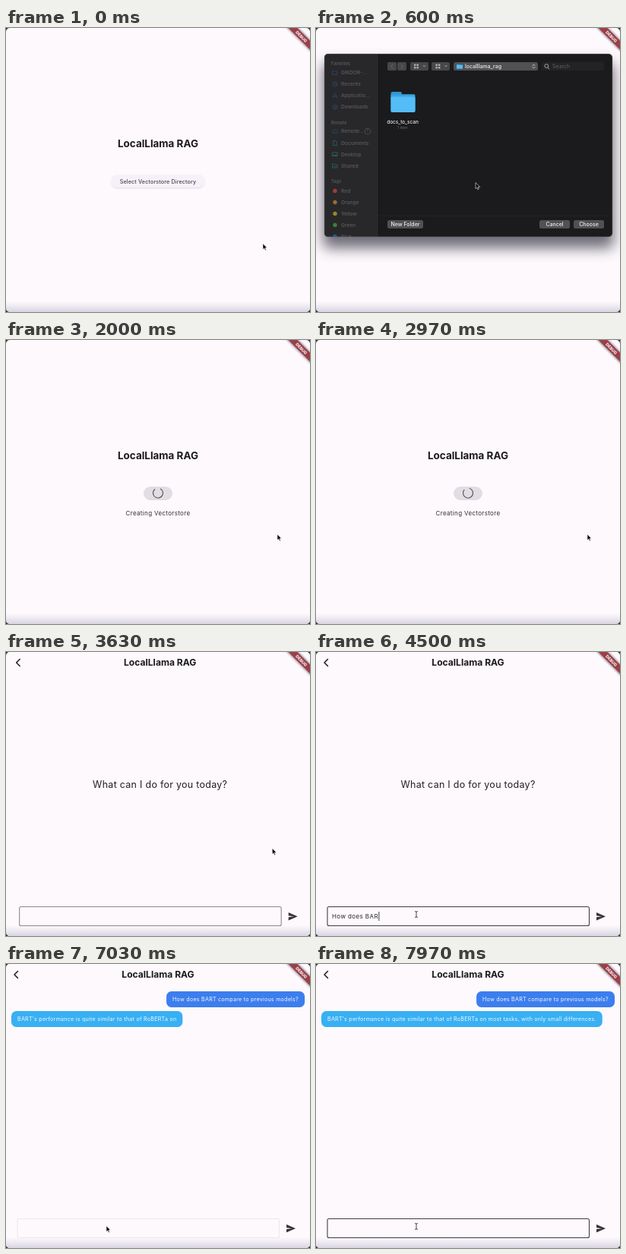
Animation of 400 by 374 pixels, one loop 8000 ms. Source, as an HTML page:

```html
<!DOCTYPE html>
<html lang="en">
<head>
<meta charset="utf-8">
<style>
  html, body { margin: 0; width: 100%; height: 100%; overflow: hidden; background: #35333a; }
  svg { display: block; width: 100vw; height: 100vh; }
  text { font-family: Inter, "Open Sans", sans-serif; white-space: pre; }
</style>
</head>
<body>
<svg viewBox="0 0 400 374">
  <defs>
    <clipPath id="window"><rect width="400" height="374" rx="5"/></clipPath>
    <clipPath id="panel"><rect x="11" y="34" width="379" height="241" rx="5"/></clipPath>
    <linearGradient id="glow" x1="0" y1="0" x2="0" y2="1">
      <stop stop-color="#d9d6e2" stop-opacity="0"/><stop offset="1" stop-color="#d3d0dd" stop-opacity=".9"/>
    </linearGradient>
    <filter id="blur" x="-20%" y="-20%" width="140%" height="150%"><feGaussianBlur stdDeviation="9"/></filter>
    <filter id="soft" x="-20%" y="-50%" width="140%" height="220%"><feGaussianBlur stdDeviation="1"/></filter>
  </defs>
  <g id="stage" clip-path="url(#window)"></g>
</svg>
<script>
const LOOP = 8000;
const BACKGROUND = '#fdf9fc', INK = '#1b1a1e';
const QUESTION = 'How does BART compare to previous models?';
const ANSWER = "BART's performance is quite similar to that of RoBERTa on most tasks, with only small differences.";

// Moments of the session, in ms
const OPEN = 470, SIDEBAR_READY = 850, ENTER_FOLDER = 1200, CHOSEN = 2000,
  CHAT = 3420, CHAT_END = 3680, FOCUS = 3950, TYPE_START = 4150, TYPE_END = 5400,
  SENT = 5520, FIRST_TOKEN = 6080, REST_START = 6280, REST_END = 7600, READY = 7750;

// Pointer stops: time, x, y
const POINTER = [[0, 338, 284], [380, 210, 204], [680, 210, 204], [1000, 115, 98], [1250, 115, 98],
  [1530, 304, 182], [1780, 357, 256], [3600, 357, 256], [3900, 132, 345], [LOOP, 132, 345]];

const stage = document.getElementById('stage');
const measure = document.createElement('canvas').getContext('2d');
const clamp = v => Math.max(0, Math.min(1, v));
const progress = (t, from, to) => clamp((t - from) / (to - from));
const ease = p => p * p * (3 - 2 * p);

const rect = (x, y, w, h, fill, r = 0, extra = '') =>
  `<rect x="${x}" y="${y}" width="${w}" height="${h}" rx="${r}" fill="${fill}" ${extra}/>`;
const path = (d, stroke, width = 1, fill = 'none') =>
  `<path d="${d}" fill="${fill}" stroke="${stroke}" stroke-width="${width}" stroke-linecap="round" stroke-linejoin="round"/>`;
const circle = (x, y, r, fill) => `<circle cx="${x}" cy="${y}" r="${r}" fill="${fill}"/>`;
const text = (x, y, size, fill, value, { weight = 400, anchor = 'start', spacing = 0 } = {}) =>
  `<text x="${x}" y="${y}" font-size="${size}" fill="${fill}" font-weight="${weight}" text-anchor="${anchor}" letter-spacing="${spacing}">${value}</text>`;
const centered = (x, y, size, fill, value, weight = 400, spacing = 0) =>
  text(x, y, size, fill, value, { weight, spacing, anchor: 'middle' });

function textWidth(value, size, spacing) {
  measure.font = `${size}px Inter, "Open Sans", sans-serif`;
  return measure.measureText(value).width + spacing * value.length;
}

function folder(x, y, w, h) {
  return rect(x, y, w * .45, h * .4, '#2f94d2', w * .06) +
    rect(x, y + h * .12, w, h * .88, '#3aa2de', w * .06) +
    rect(x, y + h * .24, w, h * .76, '#54bdf5', w * .06);
}

function pointer(t) {
  const i = Math.max(1, POINTER.findIndex(p => p[0] > t));
  const [t0, x0, y0] = POINTER[i - 1], [t1, x1, y1] = POINTER[i];
  const p = ease(progress(t, t0, t1));
  const x = x0 + (x1 - x0) * p, y = y0 + (y1 - y0) * p;
  const editing = t > 3880 && (t < SENT || t > READY);
  const shape = editing
    ? path('M-1.5-3.5Q0-3.5 0-2.5Q0-3.5 1.5-3.5M0-2.5V3.5M-1.5 4.5Q0 4.5 0 3.5Q0 4.5 1.5 4.5', INK, .8)
    : path('M0 0V7.6L1.8 6L3 8.8L4.3 8.2L3.1 5.5H5.4Z', '#f2f1f4', .6, '#08080a');
  return `<g transform="translate(${x} ${y})">${shape}</g>`;
}

function startPage(t) {
  const title = centered(200, 157, 13.45, INK, 'LocalLlama RAG', 700);
  if (t < CHOSEN) {
    return title + rect(139, 195, 122, 16, '#c9c3d6', 8, 'filter="url(#soft)" opacity=".6"') +
      rect(138, 193, 124, 17, '#f6f1f9', 8.5) +
      centered(200, 205, 7.2, '#4b4653', 'Select Vectorstore Directory', 500, .13);
  }
  const turn = (t - 2970) * .36 - 75;
  return title + rect(181, 193, 38, 18, '#e1dde3', 9) +
    `<circle cx="200" cy="201.5" r="6.5" fill="none" stroke="#5c5962" stroke-width="1.2"
      stroke-dasharray="33 8" transform="rotate(${turn} 200 201.5)"/>` +
    centered(200, 230.5, 8, '#312f36', 'Creating Vectorstore', 400, .33);
}

const ICONS = {
  folder: 'M-3-2.5H-1L0-1.5H3V2.5H-3Z',
  clock: 'M3 0A3 3 0 1 1-3 0A3 3 0 1 1 3 0M0-1.8V0L1.3.8',
  apps: 'M-3 2.5L0-3L3 2.5M-2 1H2',
  down: 'M3 0A3 3 0 1 1-3 0A3 3 0 1 1 3 0M0-1.5V1.5M-1.2.4L0 1.5L1.2.4',
  cloud: 'M-2 2.2H2.2A1.6 1.6 0 0 0 2.2-1A2.3 2.3 0 0 0-2-.8A1.5 1.5 0 0 0-2 2.2Z',
  page: 'M-2-3H1L2.3-1.7V3H-2Z',
  screen: 'M-3-2.5H3V2H-3ZM-2.5 1H2.5',
  shared: 'M-3-2.5H-1L0-1.5H3V2.5H-3ZM-1 1H1'
};

function sidebar(t) {
  const ready = t >= SIDEBAR_READY;
  const label = ready ? '#ececef' : '#5c5c5f', heading = ready ? '#98969d' : '#58585c';
  const blue = ready ? '#2386ee' : '#27486b', teal = ready ? '#3fc3d4' : '#2b5f68';
  const head = (y, value) => text(20, y + 2, 5.6, heading, value, { weight: 600 });
  const name = (y, value) => text(33, y + 2.4, 6.7, label, value, { weight: 500 });
  const item = (y, icon, value, color = blue) =>
    `<g transform="translate(25 ${y})">${path(ICONS[icon], color, .9)}</g>` + name(y, value);
  const tag = (y, color, value) =>
    `<g opacity="${ready ? 1 : .55}">${circle(25, y, 2.7, color)}</g>` + name(y, value);
  const tagsY = ready ? 234 : 202;
  const locations = head(202, 'Locations') + circle(25, 213.5, 2.8, '#7d7b82') +
    path('M22.5 213.5H27.5M25 211V216', '#b5b3ba', .5) + name(213.5, 'Network');
  return rect(11, 34, 71, 241, ready ? '#4b4951' : '#28282a') +
    head(47, 'Favorites') + item(59, 'folder', 'GRIDOR-…') + item(74, 'clock', 'Recents') +
    item(89, 'apps', 'Applicatio…') + item(104, 'down', 'Downloads') +
    head(125, 'Remote') + item(136, 'cloud', 'Remote…') +
    path('M72 136A4 4 0 1 1 64 136A4 4 0 1 1 72 136M68 136V132.5', heading, .7) +
    item(151.5, 'page', 'Documents', teal) + item(166.5, 'screen', 'Desktop', teal) +
    item(181.5, 'shared', 'Shared', teal) + (ready ? locations : '') + head(tagsY, 'Tags') +
    tag(tagsY + 12.5, '#fa5346', 'Red') + tag(tagsY + 27.5, '#fba12c', 'Orange') +
    tag(tagsY + 42.5, '#f6d42f', 'Yellow') + tag(tagsY + 57.5, '#4cc94a', 'Green') +
    tag(tagsY + 72.5, '#2f7df0', 'Blue');
}

function toolbar(name, active) {
  const button = '#474749', mark = '#b4b4b8', faint = '#707074';
  const chevron = x => path(`M${x - 1.2} 49.5L${x} 51L${x + 1.2} 49.5`, mark, .8);
  let grid = '';
  for (let i = 0; i < 4; i++) {
    const x = 129 + i % 2 * 3.5, y = 47.5 + (i >> 1) * 3.5;
    grid += rect(x, y, 2.4, 2.4, mark) + rect(x + 28.5, y, 2.4, 2.4, mark);
  }
  return rect(94, 45, 12, 11, button, 2) + rect(107, 45, 12, 11, button, 2) +
    path('M101 48L98.5 50.5L101 53', active ? '#e8e8ea' : faint, .9) + path('M112 48L114.5 50.5L112 53', faint, .9) +
    rect(124, 45, 24, 11, button, 2) + rect(152, 45, 24, 11, button, 2) + grid + chevron(142.5) + chevron(171) +
    rect(181, 45, 111, 11, '#515154', 2.5) + folder(185, 47.5, 8, 6) +
    text(196, 53, 7, '#ececef', name, { weight: 500 }) +
    rect(282, 46, 9, 9, active ? '#1f66cf' : '#515154', 2) +
    path('M285 49.5L286.5 48L288 49.5M285 51.5L286.5 53L288 51.5', '#ececef', .8) +
    rect(297, 45, 82, 11, '#232325', 2.5) + `<circle cx="303.3" cy="50" r="2.4" fill="none" stroke="${mark}" stroke-width=".9"/>` +
    path('M305.2 52L307 54', mark, .9) + text(311, 53, 7, '#606064', 'Search');
}

function pdfIcon() {
  let lines = '';
  for (let y = 85; y < 112; y += 2) lines += `M107 ${y}H114M116 ${y}H123`;
  return rect(104.5, 81, 21, 33, '#9b9b9d') + path(lines, '#6d6d70', .6);
}

function dialog(t) {
  const inside = t >= ENTER_FOLDER;
  const button = (x, w, value, fill = '#515154') =>
    rect(x, 253, w, 11, fill, 2.5) + centered(x + w / 2, 261, 7, '#f0f0f2', value, 500);
  const content = inside
    ? path('M83 67.5H390', '#29292b', .6) + pdfIcon() + centered(114, 125.5, 6.4, '#6c6c70', 'bart copy.pdf')
    : folder(98.5, 84, 32, 27) + centered(114, 125.5, 6.4, '#ececef', 'docs_to_scan', 500) +
      centered(114, 132.5, 5, '#6c6c70', '1 item');
  return `<g opacity="${progress(t, OPEN, OPEN + 90)}">` +
    rect(9, 46, 383, 244, '#4b4857', 8, 'filter="url(#blur)" opacity=".8"') +
    `<g clip-path="url(#panel)">` + rect(11, 34, 379, 241, '#1b1b1d') + sidebar(t) +
    path('M82.5 34V275', '#111113', .6) + path('M83 247.5H390', '#29292b', .6) + '</g>' +
    rect(11.3, 34.3, 378.4, 240.4, 'none', 5, 'stroke="#4e4d53" stroke-width=".6"') +
    toolbar(inside ? 'docs_to_scan' : 'localllama_rag', inside) + content +
    button(94, 47, 'New Folder') + button(294, 40, 'Cancel') +
    button(339, 40, 'Choose', inside ? '#1a62cc' : '#515154') + '</g>';
}

function bubble(value, y, fill, fromRight) {
  const size = 7.1, spacing = .26;
  const width = textWidth(value, size, spacing) + 16;
  const x = fromRight ? 393 - width : 7;
  return rect(x, y, width, 21, fill, 6.5) + text(x + 8, y + 13.2, size, '#f5f7fd', value, { spacing });
}

function answerAt(t) {
  if (t < REST_START) return ANSWER.slice(0, 4);
  const reach = 4 + (ANSWER.length - 4) * progress(t, REST_START, REST_END);
  const end = ANSWER.indexOf(' ', reach);
  return end < 0 ? ANSWER : ANSWER.slice(0, end);
}

function chatPage(t) {
  const sent = t >= SENT, waiting = sent && t < READY, focused = t >= FOCUS && !waiting;
  const typed = sent ? '' : QUESTION.slice(0, Math.round(QUESTION.length * progress(t, TYPE_START, TYPE_END)));
  const caretX = 21.5 + textWidth(typed, 8, .4);
  const caret = focused && (!sent ? typed || t % 500 < 250 : t < READY + 120);
  let out = rect(0, 0, 400, 374, BACKGROUND) + rect(0, 360, 400, 14, 'url(#glow)') +
    path('M15.5 9.5L11 14L15.5 18.5', INK, 1.5) + centered(200, 18.2, 12.1, INK, 'LocalLlama RAG', 700);
  if (!sent) out += centered(200, 179, 12.5, '#232127', 'What can I do for you today?', 400, .27);
  else out += bubble(QUESTION, 36, '#3c7eee', true);
  if (t >= FIRST_TOKEN) out += bubble(answerAt(t), 62, '#38b0f3', false);
  const border = focused ? '#403d46' : waiting ? '#ebe7ec' : '#8b8791';
  return out + rect(15, 335.5, 344.5, 25, 'none', 2, `stroke="${border}" stroke-width="1.1"`) +
    text(21, 351.3, 8, '#2b292f', typed, { spacing: .4 }) +
    (caret ? rect(caretX, 342, .9, 12, '#2b292f') : '') +
    '<path d="M369 343L381 348.2L369 353.5V349.3L376 348.2L369 347.2Z" fill="#37343c"/>';
}

function debugBanner() {
  return '<g transform="translate(388.7 11.3) rotate(45)">' +
    rect(-24, -5.5, 48, 11, '#6a6078', 0, 'filter="url(#soft)" opacity=".6"') + rect(-24, -4.2, 48, 8.4, '#9b4048') +
    centered(0, 2, 5.4, '#faf2f4', 'DEBUG', 800) + '</g>';
}

function scene(t) {
  let out = rect(0, 0, 400, 374, BACKGROUND);
  const slide = 1 - (1 - progress(t, CHAT, CHAT_END)) ** 3;
  if (slide < 1) {
    out += rect(0, 360, 400, 14, 'url(#glow)') + `<g transform="translate(${-133 * slide})">${startPage(t)}</g>`;
  }
  if (t >= OPEN && t < CHOSEN) out += dialog(t);
  if (t >= CHAT) out += `<g transform="translate(${400 * (1 - slide)})">${chatPage(t)}</g>`;
  return out + debugBanner() + pointer(t);
}

const began = performance.now();
function frame() {
  stage.innerHTML = scene((performance.now() - began) % LOOP);
  requestAnimationFrame(frame);
}
frame();
</script>
</body>
</html>
```
